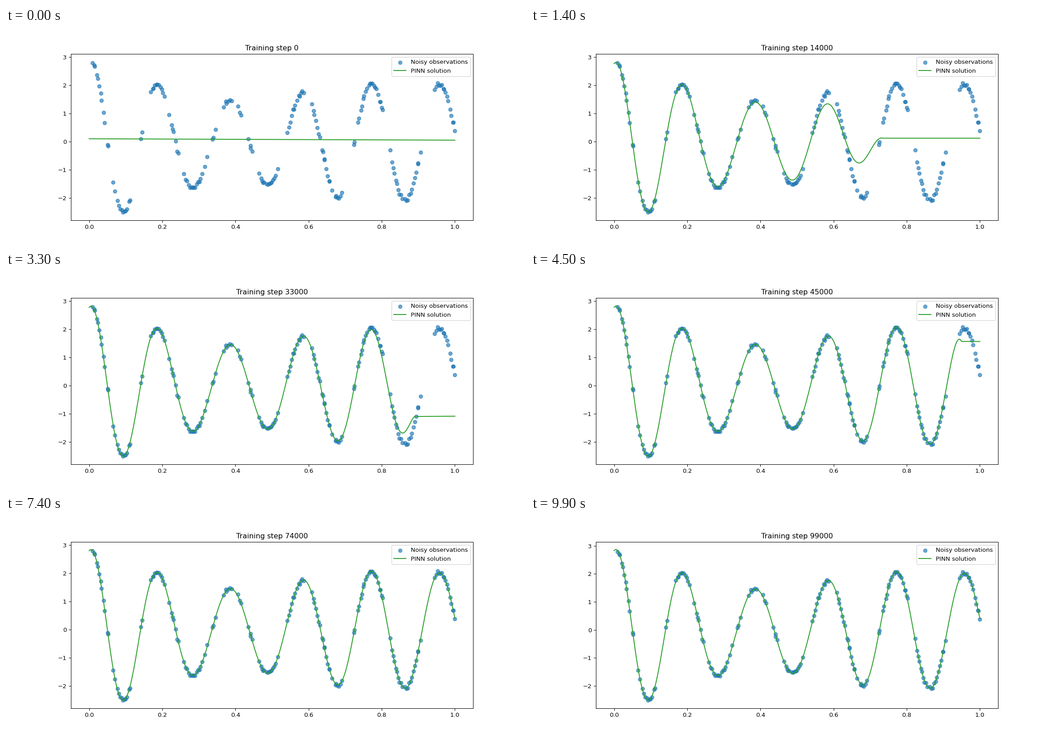
Animation of 1159 by 483 pixels, one loop 10 s. Source, as a matplotlib script:

```python
import numpy as np
import matplotlib.pyplot as plt
from matplotlib.animation import FuncAnimation

WIDTH_IN, HEIGHT_IN, DPI = 12, 5, 483 / 5  # 1159 x 483 pixels
STEPS, INTERVAL = 100, 100
LOW, HIGH = -2.53, 2.85  # extent of the observations


def wave(t):
    """Beating oscillation: amplitude and phase both wobble and settle."""
    amp = 1.9 + .95 * np.exp(-1.85 * t) * np.cos(7.3 * t)
    phase = 33 * t - .2 - .15 * t ** 2 + .36 * np.exp(-t) * np.sin(7.8 * t)
    return amp * np.cos(phase)


# Stretches of time that were sampled, at one average spacing
SPANS = [(.009, .051), (.066, .071), (.078, .111), (.142, .145), (.168, .205),
         (.221, .244), (.26, .309), (.319, .322), (.337, .346), (.369, .388),
         (.409, .415), (.436, .446), (.465, .514), (.543, .586), (.609, .663),
         (.673, .69), (.722, .725), (.734, .804), (.824, .856), (.864, .905),
         (.945, 1)]
SPACING = .0037


def observe(rng):
    t = np.concatenate([np.linspace(a, b, round((b - a) / SPACING) + 1)
                        for a, b in SPANS])
    t[1:-1] += rng.normal(0, .001, len(t) - 2)
    return t, np.clip(wave(t) + rng.normal(0, .035, len(t)), LOW, HIGH)


# The learned part ends at a front that moves right during training:
# step, front, softness, level of the unlearned tail at t = 1, its slope
KEYS = np.array([
    (0, 0, .1, .05, -.05),
    (1, .2, .08, 0, 0),
    (5, .46, .1, .05, 0),
    (14, .735, .11, .12, 0),
    (24, .845, .06, -.1, .9),
    (34, .895, .03, -1.2, 0),
    (45, .95, .015, 1.57, 0),
    (60, 1.2, .01, 1.5, 0),
]).T

T = np.linspace(0, 1, 500)


def solution(step):
    front, soft, level, slope = (np.interp(step, KEYS[0], k) for k in KEYS[1:])
    tail = level + slope * (T - 1)
    known = 1 - np.exp(-np.maximum(front - T, 0) / soft)
    # The first crest overshoots early, then creeps up late in training
    lift = np.interp(step, [0, 2, 6, 14, 66, 99], [0, .09, 0, -.02, 0, .04])
    return tail + (wave(T) - tail) * known + lift * np.exp(-T / .03)


fig, ax = plt.subplots(figsize=(WIDTH_IN, HEIGHT_IN), dpi=DPI)
ax.scatter(*observe(np.random.default_rng(3)), color="tab:blue", alpha=.65,
           label="Noisy observations")
line, = ax.plot(T, solution(0), color="tab:green", label="PINN solution")
ax.set_xlim(-.05, 1.05)
ax.legend(loc="upper right")
title = ax.set_title("")


def update(step):
    y = solution(step)
    line.set_ydata(y)
    top = max(HIGH, y.max())
    pad = .05 * (top - LOW)
    ax.set_ylim(LOW - pad, top + pad)
    title.set_text(f"Training step {step * 1000}")
    return line, title


anim = FuncAnimation(fig, update, frames=STEPS, interval=INTERVAL,
                     init_func=lambda: update(0), repeat=True, blit=False)
plt.show()
```
